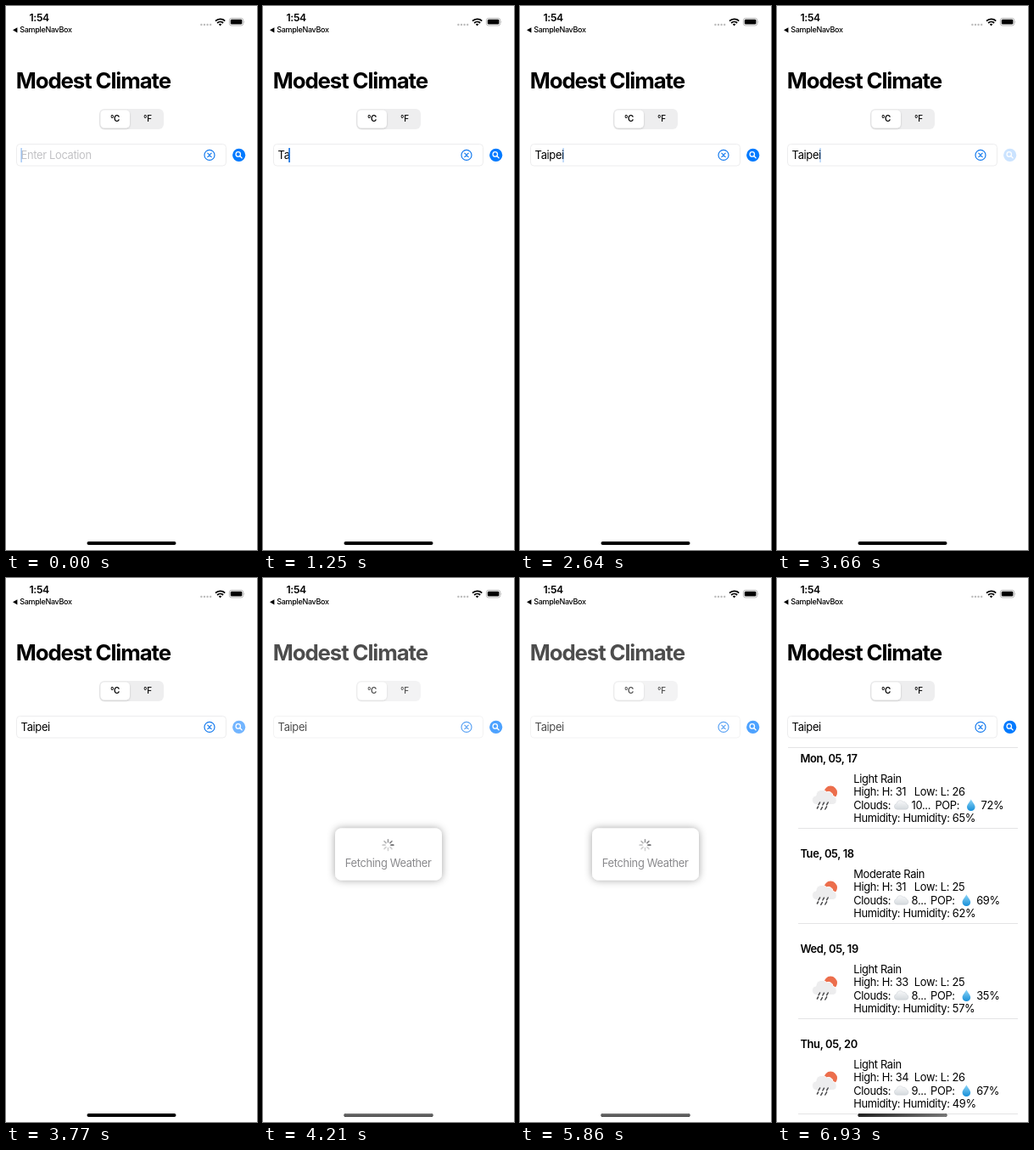
Animation, 296 px wide and 640 px high, one loop 7030 ms. Source, as an HTML page:

```html
<!DOCTYPE html>
<html lang="en">
<head>
<meta charset="utf-8">
<title>Weather search</title>
<style>
  html, body { margin: 0; width: 100%; height: 100%; overflow: hidden; background: #fff; }
  svg { display: block; width: 296px; height: 640px; }
  text { font-family: Inter, Roboto, "Liberation Sans", sans-serif; font-size: 12.9px; letter-spacing: -0.026em; white-space: pre; }
  .title { font-size: 25.8px; font-weight: 700; letter-spacing: -0.043em; }
  .clock { font-size: 12.2px; font-weight: 600; }
  .back { font-size: 9px; font-weight: 500; letter-spacing: -0.035em; }
  .seg { font-size: 9.9px; font-weight: 500; text-anchor: middle; }
  .bold { font-weight: 600; }
</style>
</head>
<body>
<svg viewBox="0 0 296 640">
  <defs>
    <filter id="soft" x="-30%" y="-40%" width="160%" height="180%">
      <feDropShadow dx="0" dy="0" stdDeviation="4.6" flood-color="#000" flood-opacity=".36"/>
    </filter>
    <filter id="lift" x="-20%" y="-20%" width="140%" height="150%">
      <feDropShadow dx="0" dy=".8" stdDeviation="1" flood-color="#000" flood-opacity=".2"/>
    </filter>
    <linearGradient id="barDim" x1="0" y1="0" x2="0" y2="1">
      <stop offset="0" stop-color="#7a7a7a"/><stop offset="1" stop-color="#484848"/>
    </linearGradient>
    <linearGradient id="barList">
      <stop offset="0" stop-color="#222"/><stop offset="1" stop-color="#777"/>
    </linearGradient>
    <linearGradient id="mist" x1="0" y1="0" x2="0" y2="1">
      <stop offset="0" stop-color="#f8f9fa"/><stop offset="1" stop-color="#d5dade"/>
    </linearGradient>
    <linearGradient id="water" x1="0" y1="0" x2="0" y2="1">
      <stop offset="0" stop-color="#8fd6f8"/><stop offset="1" stop-color="#168fd8"/>
    </linearGradient>
    <g id="cloud">
      <path d="M-5 5.2a3.4 3.4 0 0 1-.6-6.7A4.3 4.3 0 0 1 2-3.7 3.2 3.2 0 0 1 6-.9 3.1 3.1 0 0 1 5.2 5.2Z"
        fill="url(#mist)" stroke="#c6cbd0" stroke-width=".5"/>
    </g>
    <path id="drop" d="M0-6.8C1.3-3.6 4.8-.6 4.8 2.4a4.8 4.6 0 0 1-9.6 0C-4.8-.6-1.3-3.6 0-6.8Z" fill="url(#water)"/>
    <g id="rain">
      <circle cx="63.2" cy="252.4" r="7.8" fill="#ec6e4c"/>
      <path d="M46.5 266.5a5.3 5.3 0 0 1-.6-10.5A7.2 7.2 0 0 1 58.6 251.8 5.3 5.3 0 0 1 66 256.5a5.1 5.1 0 0 1 .2 10Z"
        fill="#ededee" stroke="#fff" stroke-width="1"/>
      <path d="M50.6 264l-1.6 2.8M55.5 264.2l-1.6 2.8M60.2 264l-1.6 2.8M48.6 269l-1.2 2M53.4 269.6l-1.6 2.8M58.6 268.8l-1.8 3.2"
        stroke="#48484a" stroke-width="1.5" stroke-linecap="round"/>
    </g>
  </defs>

  <rect width="296" height="640" fill="#fff"/>

  <!-- status bar -->
  <text class="clock" x="27.5" y="18">1:54</text>
  <path d="M8 28.3L13.4 25.2V31.4Z"/>
  <text class="back" x="16.3" y="31.3">SampleNavBox</text>
  <g fill="#bdbdbd">
    <circle cx="230.4" cy="22" r="1.2"/><circle cx="234" cy="22" r="1.2"/>
    <circle cx="237.6" cy="22" r="1.2"/><circle cx="241.2" cy="22" r="1.2"/>
  </g>
  <g fill="none" stroke="#000" stroke-width="1.8">
    <path d="M247 17.6a8 8 0 0 1 11.2 0M249.1 20a5 5 0 0 1 7 0"/>
    <path d="M250.8 21.6a2.6 2.6 0 0 1 3.6 0L252.6 23.4Z" fill="#000" stroke="none"/>
  </g>
  <rect x="263.4" y="14.4" width="16.4" height="8.6" rx="2.5" fill="none" stroke="#a6a6a6" stroke-width=".8"/>
  <rect x="264.8" y="15.8" width="13.6" height="5.8" rx="1.4"/>
  <path d="M280.7 17.2q1.2 1.5 0 3Z" fill="#a6a6a6"/>

  <!-- page -->
  <text class="title" x="11.8" y="96.5">Modest Climate</text>
  <rect x="110" y="121" width="76" height="24" rx="6" fill="#eeeeef"/>
  <rect x="111.4" y="122.4" width="34.6" height="21.2" rx="5" fill="#fff" filter="url(#lift)"/>
  <text class="seg bold" x="128.5" y="136.3">°C</text>
  <text class="seg" x="167" y="136.3">°F</text>

  <rect x="12.5" y="162.5" width="247" height="25.5" rx="4" fill="#fff" stroke="#ebebec" stroke-width=".9"/>
  <text id="field" x="17.6" y="180"></text>
  <rect id="caret" y="167" width="1.7" height="17" fill="#1a74e2"/>
  <g fill="none" stroke="#167bee" stroke-width="1.2" stroke-linecap="round">
    <circle cx="240" cy="175.4" r="6"/>
    <path d="M237.8 173.2l4.4 4.4M242.2 173.2l-4.4 4.4"/>
  </g>
  <g id="search">
    <circle cx="274.7" cy="175.4" r="7.6" fill="#007aff"/>
    <g fill="none" stroke="#fff" stroke-width="1.3" stroke-linecap="round">
      <circle cx="273.8" cy="174.4" r="2.7"/><path d="M275.9 176.5l2.2 2.2"/>
    </g>
  </g>

  <g id="list"></g>

  <g id="loading">
    <rect y="48" width="296" height="592" fill="#fff" opacity=".3"/>
    <rect x="85" y="294.5" width="126" height="61" rx="7.6" fill="#fff" filter="url(#soft)"/>
    <g id="spinner" transform="translate(147.5 314.2)" stroke="#6b6b6e" stroke-width="1.7" stroke-linecap="round"></g>
    <text x="96.8" y="340.3" fill="#8a8a8d">Fetching Weather</text>
  </g>

  <rect x="95.5" y="630" width="105" height="4" rx="2"/>
  <rect id="bar" x="95.5" y="630" width="105" height="4" rx="2"/>
</svg>
<script>
const LOOP = 7030, FETCH = 4210, SHOW = 6930;
const $ = id => document.getElementById(id);

// Value of the last [time, value] pair that has been reached
const at = (t, keys) => keys.reduce((v, [time, next]) => t >= time ? next : v, keys[0][1]);

const typed = [[0, ""], [1250, "Ta"], [1430, "Tai"], [1800, "Taip"], [2010, "Taipei"]];
const caretX = [[0, 17.3], [1250, 30.2], [1430, 33.2], [1800, 40.4], [2010, 50.2]];
const caretAlpha = [[0, .35], [600, .6], [720, .9], [940, 1], [2640, .3], [2880, .6],
  [3000, 1], [3540, .6], [3660, .3], [3770, 0]];
const searchAlpha = [[0, 1], [3660, .2], [3770, .55], [3880, .85], [3990, 1]];
const veil = [[0, 0], [3880, .2], [3990, .5], [4100, .8], [FETCH, 1], [SHOW, 0]];
const ticks = [FETCH, 4340, 4440, 4590, 4700, 4850, 4950, 5050, 5150, 5260, 5360, 5510, 5610, 5710, 5860]
  .map(time => [time, Math.round((time - FETCH) / 103)]);

const days = [
  ["Mon, 05, 17", "Light", 31, 26, "10", 72, 65],
  ["Tue, 05, 18", "Moderate", 31, 25, "8", 69, 62],
  ["Wed, 05, 19", "Light", 33, 25, "8", 35, 57],
  ["Thu, 05, 20", "Light", 34, 26, "9", 67, 49]
];

const rule = (x, y) => `<path d="M${x} ${y}H284" stroke="#dededf" stroke-width=".8"/>`;
const label = (x, y, s, cls = "") => `<text class="${cls}" x="${x}" y="${y}">${s}</text>`;

function dayRow([date, sky, high, low, clouds, pop, humidity], i) {
  const dx = clouds.length > 1 ? 0 : -5.4;
  return `<g transform="translate(0 ${i * 112})">` +
    label(27.4, 216.5, date, "bold") +
    `<use href="#rain"/>` +
    label(90.2, 241, sky + " Rain") +
    label(90.2, 256.3, "High: H: " + high) + label(161.8, 256.3, "Low: L: " + low) +
    label(90.2, 271.7, "Clouds:") +
    `<use href="#cloud" x="146.6" y="267"/>` +
    label(158.6, 271.7, clouds + "...") + label(186.4 + dx, 271.7, "POP:") +
    `<use href="#drop" x="${228.8 + dx}" y="267"/>` +
    label(240.6 + dx, 271.7, pop + "%") +
    label(90.2, 287, `Humidity: Humidity: ${humidity}%`) +
    rule(25, 294.5) + "</g>";
}

$("list").innerHTML = rule(13, 199.5) + days.map(dayRow).join("");
$("spinner").innerHTML = Array.from({ length: 8 },
  (_, i) => `<path d="M0-3.5V-6.3" transform="rotate(${i * 45})"/>`).join("");
const blades = [...$("spinner").children];

function draw(t) {
  const text = at(t, typed), fade = at(t, veil), done = t >= SHOW;
  const field = $("field");
  field.textContent = text || "Enter Location";
  field.setAttribute("fill", text ? "#000" : "#c2c2c5");

  $("caret").setAttribute("x", at(t, caretX));
  $("caret").setAttribute("opacity", at(t, caretAlpha));
  $("search").setAttribute("opacity", at(t, searchAlpha));
  $("loading").setAttribute("opacity", fade);
  $("list").setAttribute("visibility", done ? "visible" : "hidden");

  $("bar").setAttribute("fill", done ? "url(#barList)" : "url(#barDim)");
  $("bar").setAttribute("opacity", done ? 1 : fade);

  const head = 2 + at(t, ticks);
  blades.forEach((blade, i) => {
    const age = (head - i + 16) % 8;
    blade.setAttribute("opacity", Math.max(.3, 1 - age * .16));
  });
}

const start = performance.now();
function loop() {
  draw((performance.now() - start) % LOOP);
  requestAnimationFrame(loop);
}
draw(0);
requestAnimationFrame(loop);
</script>
</body>
</html>
```
